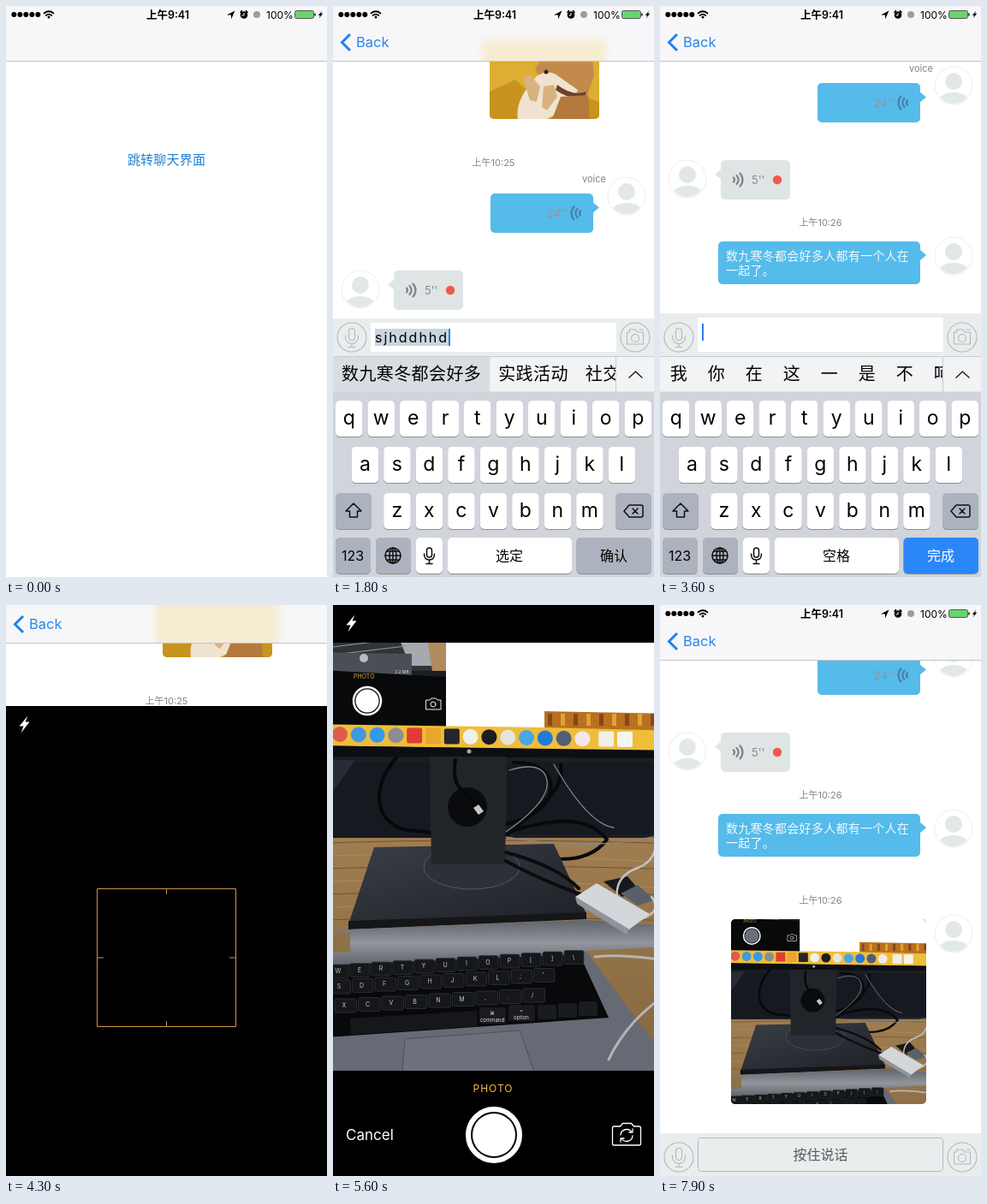
These frames come from a looping animation (375 px wide and 667 px high, 8000 ms). An HTML page:

```html
<!DOCTYPE html>
<html lang="zh">
<head>
<meta charset="utf-8">
<title>Chat demo</title>
<style>
html, body { margin: 0; width: 100%; height: 100%; overflow: hidden; background: #fff; }
svg { display: block; position: absolute; left: 0; top: 0; }
text, #input { font-family: Inter, "Noto Sans CJK SC", "Noto Sans CJK", sans-serif; }
.mid { text-anchor: middle; }
.note { font-size: 11px; fill: #85858a; }
.line { fill: none; stroke-linecap: round; stroke-linejoin: round; }
.cjk { font-size: 14px; letter-spacing: .27px; fill: #f1f9fd; }
.bar { stroke: #b3b9bc; stroke-width: 1.1; }
#input { height: 100%; box-sizing: border-box; padding: 7px 5px; font-size: 16px; line-height: 20px; letter-spacing: .3px; word-break: break-all; color: #000; }
#mark { background: #c9d6e0; letter-spacing: 2px; }
#caret { display: inline-block; width: 2px; height: 20px; margin-right: -2px; vertical-align: top; background: #2f7df0; }
</style>
</head>
<body>
<svg id="stage" width="375" height="667" viewBox="0 0 375 667">
  <defs>
    <filter id="soft" x="-30%" y="-50%" width="160%" height="200%"><feGaussianBlur stdDeviation="5"/></filter>
    <clipPath id="navBox"><rect width="375" height="64"/></clipPath>
    <clipPath id="face"><circle r="21"/></clipPath>
    <clipPath id="dogBox"><rect x="183" y="38" width="128" height="94" rx="5"/></clipPath>
    <clipPath id="shotBox"><rect x="83" y="527" width="228" height="216" rx="5"/></clipPath>
    <clipPath id="liveBox"><rect y="44" width="375" height="500"/></clipPath>
    <clipPath id="cropBox"><rect y="84" width="375" height="500"/></clipPath>
    <clipPath id="candBox"><rect y="409" width="330" height="42"/></clipPath>
    <linearGradient id="metal" x2="0" y2="1"><stop stop-color="#5f636b"/><stop offset=".5" stop-color="#92959c"/><stop offset="1" stop-color="#5c6068"/></linearGradient>
    <linearGradient id="plate" x2="1" y2="1"><stop stop-color="#3a3e46"/><stop offset="1" stop-color="#1d2025"/></linearGradient>
    <linearGradient id="wood" x2="0" y2="1"><stop stop-color="#a07d50"/><stop offset="1" stop-color="#80643f"/></linearGradient>
    <g id="avatar">
      <circle r="22" fill="#fff" stroke="#eceeef"/>
      <g clip-path="url(#face)" fill="#e2e8e8"><circle cy="-5" r="10"/><ellipse cy="19" rx="18" ry="11"/></g>
    </g>
    <g id="waves" class="line" stroke-width="2.2">
      <path d="M-5-2.5a4 4 0 0 1 0 5M-1.500-5a7 7 0 0 1 0 10M2.500-7.500a11 11 0 0 1 0 15"/>
    </g>
    <path id="bolt" d="M4-10L-6 2H-1L-4 10L6-3H1Z"/>
    <g id="desk"></g>
  </defs>

  <rect width="375" height="667" fill="#fff"/>
  <g id="home"><text id="jump" class="mid" x="187.500" y="184.500" font-size="15" letter-spacing=".2" fill="#1d80d6">跳转聊天界面</text></g>

  <g id="chat">
    <rect width="375" height="667" fill="#fff"/>
    <g id="list">
      <text class="note mid" x="187.500" y="6">上午10:25</text>
      <use href="#avatar" x="343" y="41"/>
      <g clip-path="url(#dogBox)">
        <rect x="183" y="38" width="128" height="94" fill="#dcae31"/>
        <path d="M183 100l30-14 20 18 40-6 38 14v20H183z" fill="#c8931f"/>
        <path d="M236 74l12-20 14 8 26-4 14-6 3 30-8 22-30 4-20-12z" fill="#c48a4c"/>
        <path d="M238 82q14-10 28 2l20 14-8 20-28 14h-34q-4-22 22-50z" fill="#efe3d0"/>
        <path d="M222 84l8-4 12 14-4 18-8-2zM246 94l12-2 4 14-12 16-6-4z" fill="#d9b27f"/>
        <path d="M262 92q18 14 34 8l-2 6q-18 4-34-8z" fill="#70402a"/>
        <path d="M266 106l32-2 2 28h-44z" fill="#b47a3d"/>
        <circle cx="249" cy="77" r="2.500" fill="#33241c"/>
      </g>
      <text class="note mid" x="187.500" y="187">上午10:25</text>
      <text class="note" x="291" y="206">voice</text>
      <use href="#avatar" x="343" y="222"/>
      <path d="M303 229l8 6.500-8 6.500z" fill="#55bbea"/>
      <rect x="184" y="219" width="120" height="46" rx="5" fill="#55bbea"/>
      <text x="250" y="247" font-size="13" fill="#94929f">24''</text>
      <use href="#waves" transform="translate(284 242) scale(-1 1)" stroke="#497fa5"/>
      <use href="#avatar" x="32" y="331"/>
      <path d="M72 319l-8 6.500 8 6.500z" fill="#dfe5e5"/>
      <rect x="71" y="309" width="81" height="46" rx="5" fill="#dfe5e5"/>
      <use href="#waves" x="91" y="332" stroke="#7d838b"/>
      <text x="107" y="337" font-size="13" fill="#85898f">5''</text>
      <circle cx="137" cy="332" r="5.200" fill="#ee5b4d"/>
      <g id="said">
        <text class="note mid" x="187.500" y="386">上午10:26</text>
        <use href="#avatar" x="343" y="421"/>
        <path d="M303 413l8 7-8 7z" fill="#55bbea"/>
        <rect x="68" y="404" width="236" height="50" rx="5" fill="#55bbea"/>
        <text class="cjk" x="77" y="426">数九寒冬都会好多人都有一个人在</text>
        <text class="cjk" x="77" y="443">一起了。</text>
      </g>
      <g id="shot">
        <text class="note mid" x="187.500" y="509">上午10:26</text>
        <use href="#avatar" x="343" y="544"/>
        <g clip-path="url(#shotBox)" style="--lens:#69707c"><use href="#desk" transform="translate(83 527) scale(.608) translate(-4 -99)"/></g>
      </g>
    </g>

    <rect id="barBack" width="375" fill="#e9eded"/>
    <rect id="fieldBack" x="44" width="287" rx="2" fill="#fff"/>
    <foreignObject id="field" x="44" width="287"><div id="input" xmlns="http://www.w3.org/1999/xhtml"><span id="done"></span><span id="mark"></span><span id="caret"></span></div></foreignObject>
    <g id="barIcons" class="line bar">
      <circle cx="22" r="17"/><rect x="18.500" y="-10.500" width="7" height="14" rx="3.500"/>
      <path d="M14.500-2v2a7.500 7.500 0 0 0 15 0v-2M22 7.500v4M18 11.500h8"/>
      <circle cx="353" r="17"/><path d="M343.500-6h3v-3h7l2 3h7v14h-19z"/><circle cx="353" cy="1" r="4.500"/><path d="M358-9h4"/>
    </g>
    <g id="hold">
      <rect x="44.500" y="622.500" width="286" height="39" rx="3" fill="#e9eded" stroke="#b2b8bb"/>
      <text class="mid" x="187.500" y="648" font-size="16" fill="#55595c">按住说话</text>
    </g>
    <g id="keys">
      <rect y="409" width="375" height="258" fill="#d1d4da"/>
      <rect y="409" width="375" height="41.500" fill="#f1f3f5"/>
      <g id="cands" clip-path="url(#candBox)"></g>
      <path d="M0 409.500H375M330.500 410v40" stroke="#c9cdd2"/>
      <path class="line" d="M346 434l7.500-7 7.500 7" stroke="#222" stroke-width="1.500"/>
      <g id="caps"></g>
      <g class="line" stroke="#111" stroke-width="1.500">
        <path d="M24 581l-9 9h4.500v7h9v-7H33zM340 590l6-7h14q2 0 2 2v10q0 2-2 2h-14zM350 587l6 6m0-6l-6 6"/>
        <circle cx="70" cy="642" r="9"/><ellipse cx="70" cy="642" rx="4" ry="9"/><path d="M61 642h18M70 633v18M63 637h14M63 647h14"/>
        <rect x="109.500" y="633" width="6" height="11" rx="3"/><path d="M106.500 640q0 7 6 7t6-7M112.500 647v4M109 651.500h7"/>
      </g>
      <text class="mid" x="23" y="647.500" font-size="16">123</text>
      <text id="space" class="mid" x="206" y="648" font-size="16"></text>
      <rect id="okBack" x="284.500" y="621" width="87.500" height="42" rx="5"/>
      <text id="ok" class="mid" x="328" y="648" font-size="16"></text>
    </g>
  </g>

  <g id="nav">
    <rect width="375" height="64" fill="#f7f7fa"/>
    <g clip-path="url(#navBox)"><rect id="glow" x="174" width="145" height="90" rx="6" fill="#f6e8c2" opacity=".7" filter="url(#soft)"/></g>
    <path d="M0 64.500H375" stroke="#c3c3c9"/>
    <g id="back"><path d="M20 33l-9.500 9.500 9.500 9.500" fill="none" stroke="#1f82ee" stroke-width="3"/><text x="27" y="48" font-size="16.500" fill="#2b86ea">Back</text></g>
  </g>
  <g id="status">
    <g id="dots"></g>
    <g class="line" stroke="#000" stroke-width="1.700"><path d="M44.500 8.500q5.500-4.500 11 0M46.700 11q3.300-2.600 6.600 0"/></g><circle cx="50" cy="13" r="1.500"/>
    <text class="mid" x="189" y="14.500" font-size="12.500" font-weight="600">上午9:41</text>
    <path d="M267.500 5.500l-9.500 5h5v5z"/>
    <circle cx="278" cy="10.500" r="4.300"/><path d="M278 8v3h-2.500" fill="none" stroke="#fff"/><path class="line" d="M274 7.500l1.500-2M282 7.500l-1.500-2" stroke="#000" stroke-width="1.500"/>
    <circle cx="293" cy="10" r="4" fill="#9c9ca1"/>
    <text x="304" y="14.500" font-size="12">100%</text>
    <rect x="337.500" y="5.500" width="22" height="9" rx="2" fill="#65d66f" stroke="#555"/><path d="M361 8.500v3" stroke="#555" stroke-width="2"/>
    <use href="#bolt" transform="translate(367.500 10) scale(.45)"/>
  </g>

  <g id="cam">
    <rect width="375" height="667"/>
    <g id="shoot">
      <use href="#bolt" x="21.500" y="21.500" fill="#fff"/>
      <g id="live" clip-path="url(#liveBox)"><use id="view" href="#desk"/></g>
      <path id="focus" d="M106.500 213.500h162v161h-162zM187.500 213v7M187.500 375v-7M106 294h8M269 294h-8" fill="none" stroke="#d2953f"/>
      <text class="mid" x="187" y="569" font-size="12" letter-spacing="1" fill="#f7bb3d">PHOTO</text>
      <text x="15" y="625" font-size="17" fill="#fff">Cancel</text>
      <circle cx="188" cy="619" r="30" fill="none" stroke="#fff" stroke-width="6"/><circle id="button" cx="188" cy="619" r="25" fill="#fff"/>
      <g class="line" stroke="#fff" stroke-width="1.300"><path d="M328.500 609h7l3-3.500h10l3 3.500h6q2 0 2 2v18q0 2-2 2h-29q-2 0-2-2v-18q0-2 2-2z"/><path d="M336 619a7 7 0 0 1 13-3M350 620a7 7 0 0 1-13 3M346 616h4v-4M340 623h-4v4"/></g>
    </g>
    <g id="crop">
      <g clip-path="url(#cropBox)" style="--lens:#69707c"><use href="#desk" x="-4" y="21"/></g>
      <path d="M0 84h375v36H0zM0 495h375v89H0z" opacity=".47"/>
      <text x="15" y="625" font-size="17" fill="#fff">Retake</text>
      <text x="360" y="625" font-size="17" fill="#fff" text-anchor="end">Use Photo</text>
    </g>
  </g>
</svg>

<script>
const $ = id => document.getElementById(id);
const set = (id, attrs) => { for (const k in attrs) $(id).setAttribute(k, attrs[k]); };
const show = (id, on) => { $(id).style.display = on ? '' : 'none'; };
const say = (id, s) => { if ($(id).textContent !== s) $(id).textContent = s; };
const move = (id, x, y) => set(id, { transform: `translate(${x} ${y})` });
const box = (x, y, w, h, fill, r = 0) => `<rect x="${x}" y="${y}" width="${w}" height="${h}" rx="${r}" fill="${fill}"/>`;
const shape = (d, fill) => `<path d="${d}" fill="${fill}"/>`;
const cable = (d, color, w) => `<path class="line" d="${d}" stroke="${color}" stroke-width="${w}"/>`;

// Photographed desk: monitor, stand, cables and laptop
function desk() {
  let s = box(-30, -10, 440, 310, '#1c1e25') + box(-30, 291, 440, 300, 'url(#wood)');
  for (let i = 0; i < 9; i++) s += cable(`M-30 ${298 + i * 15}q200-8 440 ${i % 2 * 8}`, i % 2 ? '#b08d5c' : '#66502f', .9);
  s += shape('M-30 203h147v88H-30zM207 203h200v84H207z', '#171920') + shape('M-30 200h60l-24 34h-36z', '#282c35');
  // Small laptop and camera app shown on the monitor
  s += box(-30, -10, 166, 106, '#303338') + shape('M66 20h42l14 70H94z', '#a6a9af') + shape('M108 20h30v76h-18z', '#b28b5d');
  for (let i = 0; i < 4; i++) s += cable(`M-20 ${53 + i * 9}L${74 + i * 5} ${40 + i * 9}`, '#8f9298', 1.2);
  s += shape('M-30 74l126 2v27l-126-8z', '#4b4e54') + shape('M-30 94l166 9v60H-30z', '#08090b');
  s += '<circle cx="40" cy="81" r="5" fill="#b9bcc1"/><text x="76" y="99" font-size="5" fill="#ddd">3.2 MB</text>';
  s += '<text x="28" y="105" font-size="7" fill="#e5a637">PHOTO</text>';
  s += '<circle cx="44" cy="131" r="16" fill="none" stroke="#fff" stroke-width="2.500"/><circle cx="44" cy="131" r="13.500" style="fill:var(--lens,#fff)"/>';
  s += '<g class="line" stroke="#eee"><path d="M113 130h4l2-2h5l2 2h4v11h-17z"/><circle cx="121" cy="135" r="3"/></g>';
  s += shape('M136-10h280v176H136z', '#fff') + shape('M251 143l160 3v22l-160-5z', '#b9701f');
  for (let i = 0; i < 9; i++) s += box(255 + i * 15, 146, 5, 14, i % 2 ? '#e0a232' : '#86481b');
  s += shape('M-30 158l280 4 160 4v24l-440-7z', '#f0bd3a') + shape('M-30 183l440 6v9l-440-2z', '#0d0e12');
  const icons = '#df5c4a #3f9ae0 #3199ee #8a8d92 #df3c35 #e9a52d #25262a #eef1ea #1c1d22 #e8e4da #49a4e8 #2479dc #4e6077 #f2e8ec #f1efe9 #f5f5f0'.split(' ');
  icons.forEach((c, i) => {
    const x = 12 + 21.8 * i + (i > 13 ? 6 : 0), y = 170 + i * .4;
    s += [4, 5, 6, 14, 15].includes(i) ? box(x - 9, y - 9, 18, 18, c, 2) : `<circle cx="${x}" cy="${y}" r="9" fill="${c}"/>`;
  });
  s += '<circle cx="163" cy="190" r="2.500" fill="#a5a7ac"/>';
  s += cable('M78 197C54 225 52 256 70 272s36 8 52 14', '#07080a', 4);
  s += cable('M205 275C280 260 270 200 215 203M205 290C250 250 275 235 270 205M206 285q90-30 118 8-30 40-118 10', '#08090b', 4);
  s += cable('M210 212q40-12 44 12t-48 60M206 290q100 18 180-2M262 205q40 70 70 74', '#83868b', 1.3);
  s += shape('M52 302L262 298l38 82L22 392z', 'url(#plate)') + shape('M22 388l278-10v8L22 398z', '#14161a');
  s += '<ellipse cx="166" cy="325" rx="56" ry="26" fill="#2c3037" stroke="#555a63"/>';
  s += shape('M117 196h90l-2 126h-86z', '#212429') + '<circle cx="161" cy="255" r="23" fill="#0a0b0d"/>';
  s += cable('M147 200q-4 26 8 36t16 18', '#07080a', 4) + shape('M168 256l6-4 6 8-6 4z', '#c4c6c8');
  s += cable('M206 318q40 22 90 40M206 308q60 16 85 42', '#0b0c0f', 4);
  s += shape('M320 342l28-6 12 14-18 10z', '#17181c') + shape('M340 356l20-10 20 18-20 6z', '#59606b');
  s += cable('M336 364q-4-28 24-38t20-50M352 390q40-10 24-30', '#c3c3c2', 2.4);
  s += shape('M-30 403L22 398 300 387l110 8v22L-30 441z', 'url(#metal)') + shape('M-30 398l54 4v22l-54 4z', '#8f7148');
  s += shape('M287 360l25-16 62 36-24 18z', '#d3d6da') + shape('M287 360l63 38-3 6-58-36z', '#8f949c');
  s += shape('M-30 438L300 424l90 122v60H-30z', '#656a74') + shape('M-30 441l322-14 34 74-356 25z', '#08090b');
  const rows = [['WERTYUIOP[]\\', 10, 449, 25], ['SDFGHJKL;\'', 11, 467, 26.5], ['XCVBNM,./', 17, 489, 27.5]];
  for (const [letters, x0, y0, pitch] of rows) [...letters].forEach((c, i) => {
    const x = x0 + pitch * i, y = y0 - i * 1.5;
    s += `<rect x="${x - 11}" y="${y - 10}" width="${pitch - 2}" height="16" rx="2" fill="#15171b" stroke="#34373d" stroke-width=".7"/>`;
    s += `<text class="mid" x="${x}" y="${y}" font-size="7" fill="#c5c7ca">${c}</text>`;
  });
  s += shape('M24 502l148-9 1 18-148 10z', '#15171b');
  [['⌘', 'command', 190, 506], ['=', 'option', 224, 503]].forEach(([a, b, x, y]) => {
    s += box(x - 15, y - 17, 31, 19, '#191b20', 2) + `<text class="mid" x="${x}" y="${y - 8}" font-size="6" fill="#ddd">${a}</text><text class="mid" x="${x}" y="${y}" font-size="6" fill="#ddd">${b}</text>`;
  });
  for (let i = 0; i < 3; i++) s += box(243 + i * 24, 486 - i * 2, 22, 17, '#191b20', 2);
  s += '<path d="M82 600l6-74 134-10 30 84z" fill="#6c717b" stroke="#4b5059"/>';
  s += cable('M400 470q-50 30-74 80M310 430q30-4 80 4', '#b4b5b6', 3);
  return s;
}

function caps() {
  let s = '';
  const cap = (x, y, w, fill = '#fff') => { s += box(x, y + 1, w, 42, '#8b8e94', 5) + box(x, y, w, 42, fill, 5); };
  [['qwertyuiop', 3, 461], ['asdfghjkl', 21.7, 515], ['zxcvbnm', 59.2, 569]].forEach(([row, x0, y]) =>
    [...row].forEach((c, i) => {
      const x = x0 + i * 37.5;
      cap(x, y, 31.5);
      s += `<text class="mid" x="${x + 15.7}" y="${y + 28}" font-size="23">${c}</text>`;
    }));
  const grey = '#adb3be';
  cap(3, 569, 42, grey); cap(330, 569, 42, grey);
  cap(3, 621, 41, grey); cap(50, 621, 41, grey);
  cap(97, 621, 31); cap(134, 621, 145); cap(284.5, 621, 87.5, grey);
  return s;
}

$('desk').innerHTML = desk();
$('caps').innerHTML = caps();
$('dots').innerHTML = [0, 1, 2, 3, 4].map(i => `<circle cx="${9.3 + i * 7}" cy="10" r="3"/>`).join('');

let candKey = '';
function drawCands(words, picked) {
  const key = words.join() + picked;
  if (key === candKey) return;
  candKey = key;
  let x = 0, s = '';
  words.forEach((w, i) => {
    const len = w.length * 20.4, cell = Math.max(44, len + 20);
    if (picked && !i) s += box(0, 410, cell, 41, '#d9dde2');
    s += `<text x="${x + (cell - len) / 2}" y="437" font-size="20" letter-spacing=".4">${w}</text>`;
    x += cell;
  });
  $('cands').innerHTML = s;
}

// Linear track through [time, value] points
function track(points, t) {
  let [t0, v0] = points[0];
  for (const [t1, v1] of points) {
    if (t < t1) return t1 > t0 ? v0 + (v1 - v0) * (t - t0) / (t1 - t0) : v0;
    t0 = t1; v0 = v1;
  }
  return v0;
}

const PUSH = [[100, 375], [200, 210], [300, 40], [400, 0]];
const SCROLL = [[800, -252], [900, -110], [1000, 0], [3200, 0], [3300, 60], [3400, 115], [3500, 129], [3700, 129], [3900, 74], [4200, 74], [4300, 71], [4400, 74], [6700, 74], [6800, 110], [6900, 148], [7000, 160]];
const KEYS = [[800, 258], [900, 110], [1000, 0], [3700, 0], [3800, 140], [3900, 258]];
const CAM = [[4100, 667], [4200, 430], [4300, 118], [4400, 8], [4500, 0], [6400, 0], [6500, 180], [6600, 540], [6700, 667]];
const SWAY_X = [[4500, 8], [5000, 0], [5100, 0], [5400, -4]];
const SWAY_Y = [[4500, 14], [5000, 0], [5100, 0], [5400, -19]];
const PINYIN = 'sjhddhhd';
const GUESS = ['数九寒冬都会好多', '实践活动', '社交'];
const COMMON = [...'我你在这一是不呵'];
const PARTS = [GUESS[0], '人', '都', '有', '一个', '人', '在', '一起', '了', '。'];

function draw(t) {
  const push = track(PUSH, t), drop = track(KEYS, t);
  move('home', (push - 375) / 3, 0);
  set('jump', { opacity: t === 100 ? .3 : 1 });
  move('chat', push, 0);
  set('back', { opacity: 1 - push / 375 });

  // Typing
  const count = t < 2000 ? Math.max(0, Math.min(8, (t - 1000) / 100)) : 0;
  const sent = t >= 3200;
  const text = sent || t < 2000 ? '' : PARTS.slice(0, (t - 1900) / 100).join('');
  say('mark', PINYIN.slice(0, count));
  say('done', text);
  show('caret', drop < 258);
  drawCands(count ? GUESS.map(w => w.slice(0, count)) : COMMON, count > 0);
  say('space', count ? '选定' : '空格');
  say('ok', count ? '确认' : '完成');
  set('okBack', { fill: count ? '#adb3be' : '#2b87f8' });
  set('ok', { fill: count ? '#000' : '#fff' });
  move('keys', 0, drop);

  const tall = text.length > 16 ? 64 : count || text ? 44 : 50;
  const bottom = 409 + drop, top = bottom - tall;
  set('barBack', { y: top, height: tall });
  set('fieldBack', { y: top + 5, height: tall - 10 });
  set('field', { y: top + 5, height: tall - 10 });
  move('barIcons', 0, bottom - 22);
  show('hold', t >= 7700);

  // Messages
  const scroll = track(SCROLL, t) + (tall > 50 ? 20 : 0);
  const full = t >= 4200 && t < 6500;
  move('list', 0, -scroll);
  show('said', sent);
  show('shot', t >= 6700);
  show('status', !full);
  move('nav', 0, full ? -20 : 0);
  set('glow', { y: 38 - scroll + (full ? 20 : 0) });
  show('glow', push < 375 && scroll > -60 && scroll < 120);

  // Camera
  const cam = track(CAM, t), cropping = t >= 5700;
  show('cam', cam < 667);
  move('cam', 0, cam);
  show('shoot', !cropping);
  show('crop', cropping);
  set('live', { opacity: track([[4500, 0], [4700, 1]], t) });
  move('view', track(SWAY_X, t), track(SWAY_Y, t));
  show('focus', t < 4900);
  set('button', { fill: t === 5500 ? '#777' : '#fff' });
}

const start = performance.now();
let last = -1;
function tick() {
  const t = Math.floor((performance.now() - start) % 8000 / 100) * 100;
  if (t !== last) draw(last = t);
  requestAnimationFrame(tick);
}
tick();
</script>
</body>
</html>
```
